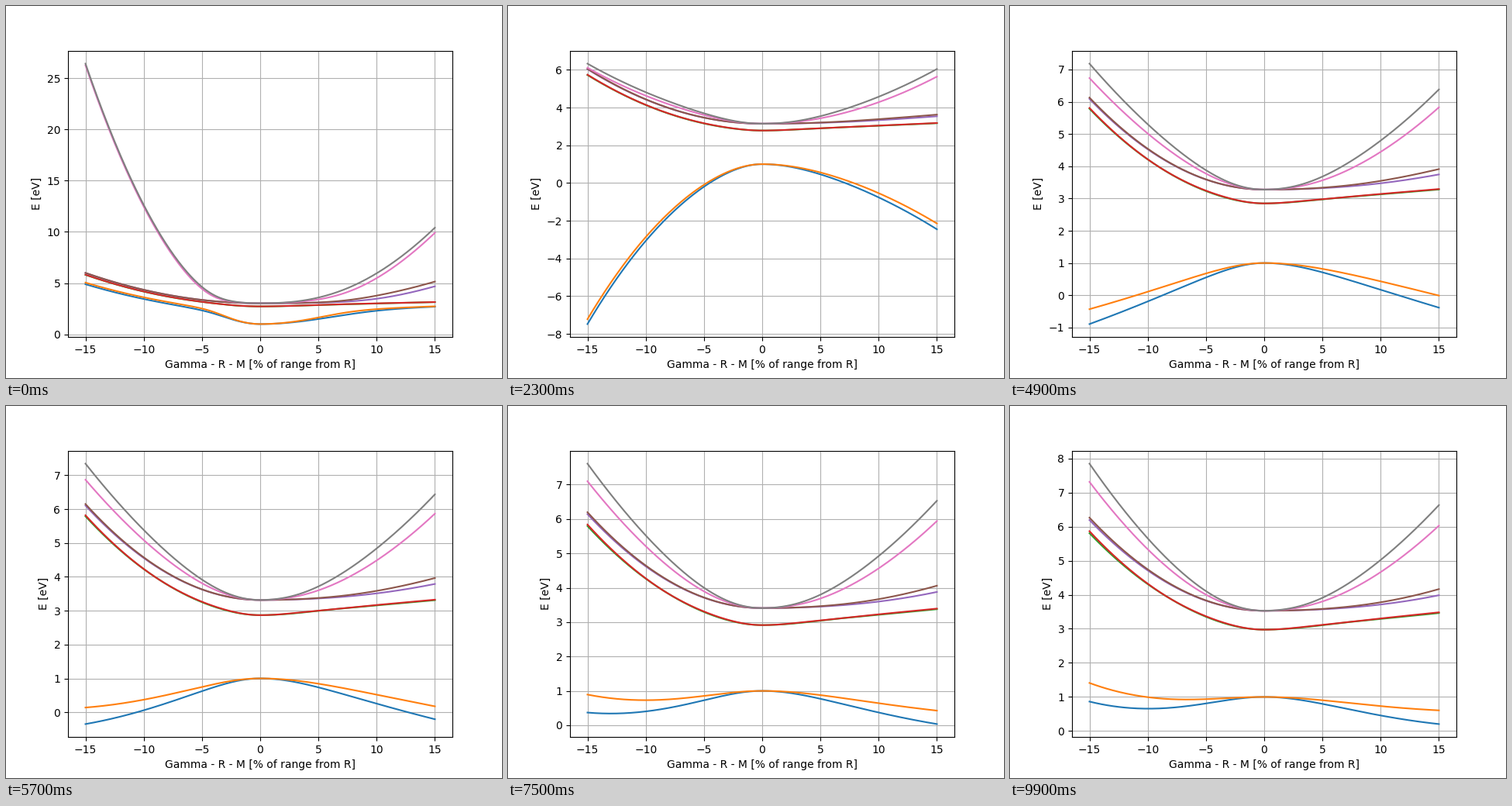
A matplotlib script that plays this animation: 640 by 480 pixels, repeating every 10000 ms.

```python
import matplotlib.pyplot as plt
import numpy as np
from matplotlib.animation import FuncAnimation

FRAMES = 100
k = np.linspace(-15, 15, 241)
u2 = (k / 15) ** 2
u = np.sqrt(u2)
left = k < 0

# spin-orbit coupling between p_x, p_y (one spin) and p_z (other spin)
SPIN_ORBIT = np.array([[0, -1j, 1], [1j, 0, -1j], [1, 1j, 0]])


def block(n, m_left, p_left, p_par, p_perp):
    """Energies of one s + 3p block for every k."""
    delta = 0.303 + 0.00254 * n
    e0 = 2.926 + 0.00423 * n
    s = 3.95 + 0.0021 * n - 172 / (n - 8.21)

    par = np.where(left, 2.504 - 0.00423 * n, 2.46 - 0.0037 * n)
    perp = np.where(left, m_left, 0.2)

    h = np.zeros((k.size, 4, 4), complex)
    h[:, 1:, 1:] = SPIN_ORBIT * delta / 3
    h[:, 0, 0] = 1 + np.where(left, s, s / 3) * u2
    h[:, 1, 1] = e0 + par * u2
    h[:, 2, 2] = h[:, 3, 3] = e0 + perp * u2
    h[:, 0, 1] = h[:, 1, 0] = np.sqrt(np.where(left, p_left, p_par)) * u
    h[:, 0, 2] = h[:, 2, 0] = np.sqrt(np.where(left, 0, p_perp)) * u
    return np.linalg.eigvalsh(h)


def bands(n):
    a = block(n, 2.96 - 0.0030 * n, 10.92, 4.2 + 0.0075 * n, 2.0)
    b = block(n, 2.97 - 0.0024 * n, 7.42, 1.3 + 0.006 * n, 2.2)
    return np.sort(np.hstack([a, b]), axis=1)


fig, ax = plt.subplots(figsize=(6.4, 4.8), dpi=100)


def draw(n):
    ax.clear()
    ax.plot(k, bands(n))
    ax.set_xlabel("Gamma - R - M [% of range from R]")
    ax.set_ylabel("E [eV]")
    ax.grid(True)
    return ax.lines


anim = FuncAnimation(fig, draw, frames=FRAMES, interval=100,
                     repeat=True, repeat_delay=0, blit=False)
plt.show()
```
